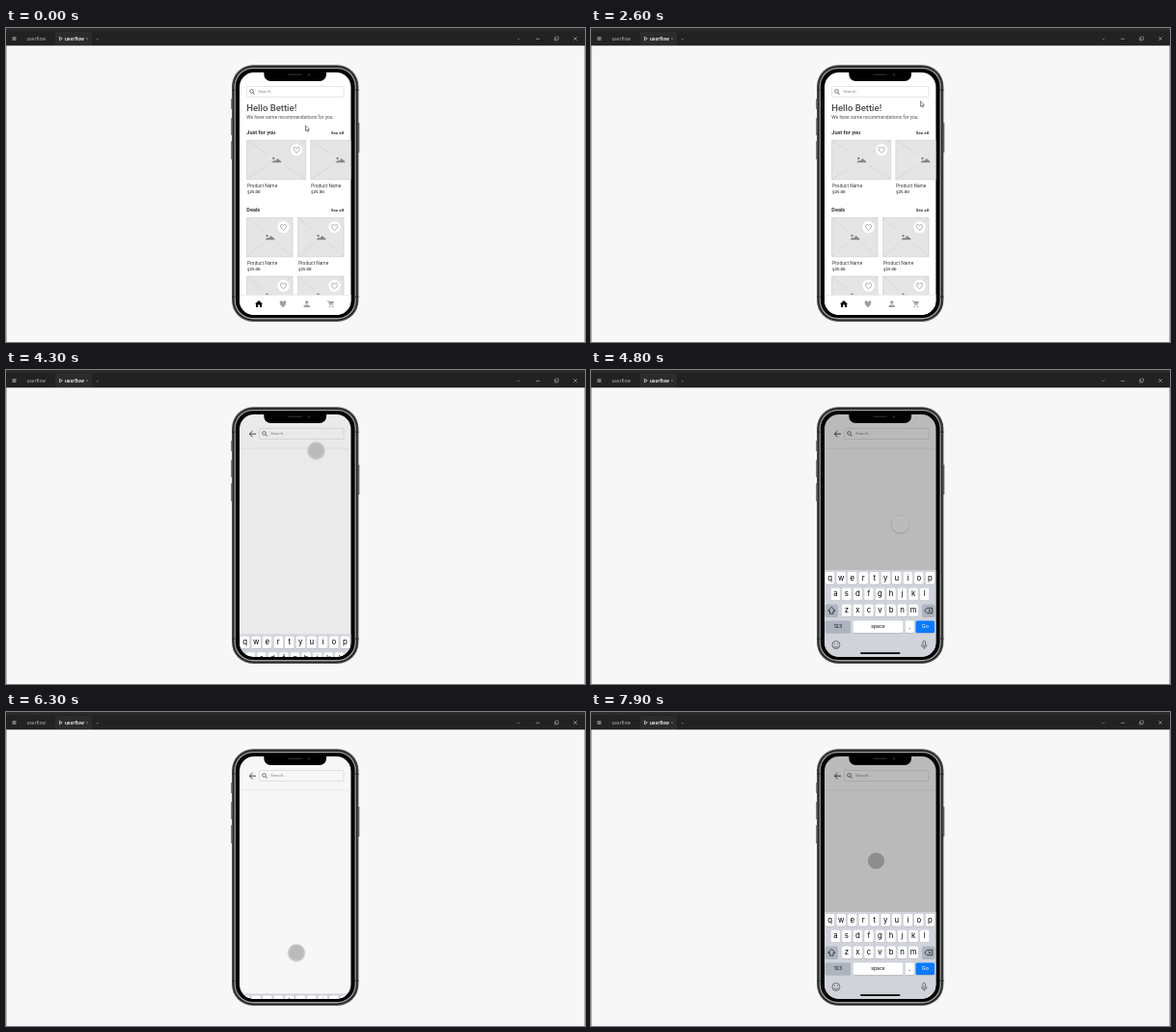
An HTML page with a canvas for the animation above (8 s loop, 600 by 325 pixels).

```html
<!DOCTYPE html>
<html lang="en">
<head>
<meta charset="utf-8">
<title>Search prototype</title>
<style>
html, body { margin: 0; width: 100%; height: 100%; overflow: hidden; background: #f7f7f7; }
canvas { display: block; width: 600px; height: 325px; }
</style>
</head>
<body>
<canvas id="stage"></canvas>
<script>
const LOOP = 8000, STEP = 100;
const UI = 'Roboto, sans-serif', KEYS = 'Inter, sans-serif';
const SCREEN = { x: 242, y: 46, w: 115.4, h: 251 };
const canvas = document.getElementById('stage');
const c = canvas.getContext('2d');
const dpr = window.devicePixelRatio || 1;
canvas.width = 600 * dpr;
canvas.height = 325 * dpr;

// Pointer moves; a sine bulge with the given half waves bends the way
const START = { x: 310.5, y: 101 };
const MOVES = [
  { from: 200, to: 1000, x: 289.5, y: 93.5, bx: -117, by: -22, waves: 1 },
  { from: 1500, to: 1600, x: 319.2, y: 184.8 },
  { from: 2000, to: 2900, x: 329, y: 86, bx: -15, by: 36, waves: 2 },
  { from: 2900, to: 3000, x: 321.5, y: 77 },
  { from: 4200, to: 4800, x: 320.5, y: 160 },
  { from: 4800, to: 6000, x: 301, y: 249, bx: 33, by: 12, waves: 1 },
  { from: 6300, to: 6800, x: 301, y: 81 },
  { from: 7300, to: 7900, x: 295.5, y: 154 }
];
const TAPS = [[4000, 4900], [6100, 6500], [7100, 7500]];

const clamp = v => Math.min(1, Math.max(0, v));

// CSS ease-out: cubic-bezier(0, 0, .58, 1)
function easeOut(x) {
  if (x <= 0 || x >= 1) return clamp(x);
  let lo = 0, hi = 1;
  for (let i = 0; i < 24; i++) {
    const u = (lo + hi) / 2;
    if (1.74 * u * u * (1 - u) + u ** 3 < x) lo = u; else hi = u;
  }
  return 3 * lo * lo - 2 * lo ** 3;
}

function pointer(t) {
  let p = START;
  for (const { from, to, x, y, bx = 0, by = 0, waves = 1 } of MOVES) {
    if (t < from) break;
    const k = clamp((t - from) / (to - from)), s = k * k * (3 - 2 * k);
    const bend = Math.sin(Math.PI * waves * s);
    p = { x: p.x + (x - p.x) * s + bx * bend, y: p.y + (y - p.y) * s + by * bend };
  }
  return p;
}

function stroke(color, lw = 0.6) {
  c.strokeStyle = color;
  c.lineWidth = lw;
  c.stroke();
}

function fill(color) {
  c.fillStyle = color;
  c.fill();
}

function box(x, y, w, h, color, r = 0) {
  c.beginPath();
  c.roundRect(x, y, w, h, r);
  if (color) fill(color);
}

function disc(x, y, r, color) {
  c.beginPath();
  c.arc(x, y, r, 0, 7);
  if (color) fill(color);
}

function path(...pts) {
  c.beginPath();
  for (let i = 0; i < pts.length; i += 2) c.lineTo(pts[i], pts[i + 1]);
}

// Closed outline from its right half, mirrored about x
function mirrored(x, y, half) {
  c.beginPath();
  half.forEach(([px, py]) => c.lineTo(x + px, y + py));
  [...half].reverse().forEach(([px, py]) => c.lineTo(x - px, y + py));
  c.closePath();
}

function text(s, x, y, size, color, weight = 400, align = 'left', family = UI) {
  c.font = `${weight} ${size}px ${family}`;
  c.textAlign = align;
  c.fillStyle = color;
  c.fillText(s, x, y);
}

function cross(x, y, r, color) {
  for (const s of [-1, 1]) {
    path(x - r, y - r * s, x + r, y + r * s);
    stroke(color);
  }
}

function heart(x, y, s) {
  c.beginPath();
  c.moveTo(x, y + s);
  for (const d of [-1, 1]) {
    c.moveTo(x, y + 0.95 * s);
    c.bezierCurveTo(x + d * 1.6 * s, y - 0.3 * s, x + d * 0.7 * s, y - 1.6 * s, x, y - 0.5 * s);
  }
}

function appWindow() {
  box(0, 0, 600, 325, '#f7f7f7');
  box(0, 0, 600, 18.3, '#222');
  box(0, 0, 600, 3, '#2b2b2b');
  box(51, 4, 38, 14, '#2c2c2c');
  for (const x of [0, 599.5]) box(x, 18, 0.5, 307, '#777');
  box(6.5, 9, 4, 4, '#777');
  text('userflow', 21.5, 12.7, 4.8, '#b5b5b5', 400, 'left', KEYS);
  text('userflow', 61, 12.7, 4.7, '#fff', 600, 'left', KEYS);
  path(55.5, 9.2, 58.3, 11, 55.5, 12.8);
  c.closePath();
  stroke('#fff');
  cross(84, 11, 1, '#777');
  text('+', 95, 12.8, 5, '#888', 400, 'center', KEYS);
  path(529.5, 10.5, 531, 12, 532.5, 10.5);
  stroke('#888');
  path(549, 11.3, 553, 11.3);
  stroke('#bbb');
  for (const d of [0, 1]) {
    box(568.5 + d, 10 - d, 3, 3, '#222');
    stroke('#aaa', 0.5);
  }
  cross(590, 11, 1.8, '#bbb');
}

function phone() {
  for (const [y, h] of [[73, 11], [93, 18], [117, 19]]) box(233.2, y, 1.5, h, '#666', 0.6);
  box(364.8, 98, 1.5, 31, '#666', 0.6);
  ['#555', '#1c1c1c', '#a0a2a4', '#000'].forEach((color, i) => {
    const d = i * 1.3;
    box(234 + d, 38.3 + d, 131.4 - 2 * d, 265.7 - 2 * d, color, 22 - d);
  });
  for (const y of [63.5, 277.5])
    for (const x of [234, 362]) box(x, y, 3.4, 1.5, '#333');
}

function notch() {
  box(267.3, 45, 64.7, 10, '#000', [0, 0, 7, 7]);
  box(292, 47.5, 15, 1.5, '#252525', 0.7);
  disc(314, 48.3, 1.3, '#20232c');
}

function searchBox(x) {
  box(x, 60.5, 350 - x, 11, null, 1);
  stroke('#d6d6d6');
  disc(x + 5, 65.4, 1.8);
  stroke('#555', 0.8);
  path(x + 6.3, 66.8, x + 8.2, 68.6);
  stroke('#555', 0.9);
  text('Search...', x + 11.7, 67.4, 4.2, '#858585');
}

function card(x, y, w) {
  const h = 40.5, mx = x + w / 2, my = y + h / 2;
  box(x, y, w, h, '#e5e5e5');
  stroke('#cacaca');
  for (const sx of [-w / 2, w / 2]) for (const sy of [-h / 2, h / 2]) {
    path(mx + sx * 0.3, my + sy * 0.3, mx + sx, my + sy);
    stroke('#d0d0d0');
  }
  path(mx - 5, my + 2.6, mx - 2.5, my + 0.4, mx - 0.8, my + 1, mx + 1.2, my - 1.6,
    mx + 5, my + 1.4, mx + 5, my + 2.6);
  fill('#858585');
  disc(mx - 2.8, my - 1.5, 1.2, '#858585');
  const hx = x + w - 9.5, hy = y + 9.8;
  disc(hx, hy, 6.2, '#fff');
  heart(hx, hy + 0.2, 3.3);
  stroke('#777');
}

function product(x, y, w) {
  card(x, y, w);
  text('Product Name', x + 0.3, y + 48.2, 4.9, '#3a3a3a');
  text('$25.00', x + 0.3, y + 55, 4.4, '#333', 500);
}

function heading(s, y) {
  text(s, 249.3, y, 5.55, '#333', 600);
  text('See all', 350, y, 4.4, '#333', 600, 'right');
}

function navBar() {
  const grey = '#a0a0a0';
  box(242, 276.3, 116, 21, '#fff');
  box(242, 276, 116, 0.6, '#ddd');
  mirrored(262, 282, [[0, 0], [4, 3.8], [3, 3.8], [3, 7], [1, 7], [1, 4.5]]);
  fill('#000');
  heart(287, 285.7, 3.7);
  fill(grey);
  disc(311.7, 283.9, 1.7, grey);
  box(308.5, 286.5, 6.4, 2.4, grey, [1.5, 1.5, 0, 0]);
  path(332.8, 282.4, 334, 282.4, 335.6, 286.7, 338.8, 286.7);
  stroke(grey, 0.8);
  mirrored(337.2, 283, [[2.8, 0], [1.6, 2.8]]);
  fill(grey);
  for (const x of [335.4, 338.8]) disc(x, 288.6, 0.8, grey);
}

function homeScreen() {
  box(242, 46, 116, 251, '#fff');
  searchBox(249.5);
  text('Hello Bettie!', 249.2, 86, 9.5, '#4a4a4a', 500);
  text('We have some recommendations for you.', 249.3, 93.9, 4.92, '#505050');
  heading('Just for you', 110.2);
  for (const x of [249.6, 315.8]) product(x, 116.3, 61);
  heading('Deals', 190);
  for (const x of [249.6, 302.6]) {
    product(x, 196.3, 47.4);
    card(x, 257, 47.4);
  }
  navBar();
}

function searchScreen() {
  box(242, 46, 116, 251, '#fbfbfb');
  box(242, 80.7, 116, 0.6, '#dcdcdc');
  path(259, 66.2, 252.4, 66.2);
  stroke('#333', 0.9);
  path(255.5, 63, 252.3, 66.2, 255.5, 69.4);
  stroke('#333', 0.9);
  searchBox(262.5);
}

function key(x, y, w, color, label, size = 7.8, ink = '#000') {
  box(x, y + 0.5, w, 12.7, '#a2a5ab', 1.6);
  box(x, y, w, 12.7, color, 1.6);
  text(label, x + w / 2, y + 6.1 + size * 0.31, size, ink, 400, 'center', KEYS);
}

function keyboard() {
  const grey = '#aeb4bf', ink = '#50555c', pitch = 11.53, rowY = i => 209 + 16.8 * i;
  box(242, 207, 116, 91, '#d0d3da');
  ['qwertyuiop', 'asdfghjkl', 'zxcvbnm'].forEach((row, r) => [...row].forEach((ch, i) =>
    key(294.7 + (i - (row.length - 1) / 2) * pitch, rowY(r), 9.6, '#fff', ch)));
  for (const x of [242.8, 343.2]) key(x, rowY(2), 13, grey, '');
  mirrored(249.3, 245.3, [[0, 0], [3.7, 3.9], [1.8, 3.9], [1.8, 6.9]]);
  stroke('#111', 0.7);
  path(345.8, 249, 348.3, 246.3, 353.7, 246.3, 353.7, 251.7, 348.3, 251.7);
  c.closePath();
  stroke('#111', 0.7);
  cross(350.8, 249, 1.2, '#111');
  key(242.8, rowY(3), 26.2, grey, '123', 5);
  key(271.5, rowY(3), 52, '#fff', 'space', 5);
  key(325.5, rowY(3), 9.4, '#fff', '.');
  key(336.6, rowY(3), 19.4, '#0a7aff', 'Go', 5.4, '#fff');
  disc(253.9, 284.5, 4);
  stroke(ink, 0.8);
  for (const d of [-1.5, 1.5]) disc(253.9 + d, 283.3, 0.6, ink);
  c.beginPath();
  c.arc(253.9, 284.9, 2.1, 0.2, Math.PI - 0.2);
  stroke(ink, 0.8);
  box(344, 280.3, 2.6, 5.2, null, 1.3);
  stroke(ink, 0.8);
  c.beginPath();
  c.arc(345.3, 284.3, 2.8, 0, Math.PI);
  stroke(ink, 0.8);
  box(344.9, 287.1, 0.8, 2, ink);
  box(279, 292.3, 41.5, 1.6, '#000', 0.8);
}

function arrow({ x, y }) {
  c.save();
  c.translate(x, y);
  path(0, 0, 0, 5.6, 1.3, 4.4, 2.2, 6.4, 3, 6, 2.2, 4.1, 3.9, 4.1);
  c.closePath();
  fill('#fff');
  stroke('#333');
  c.restore();
}

function touch({ x, y }, pressed) {
  if (!pressed) return disc(x, y, 8.6, 'rgba(0,0,0,.24)');
  c.save();
  c.shadowColor = 'rgba(0,0,0,.3)';
  c.shadowBlur = 2 * dpr;
  c.shadowOffsetY = 0.6 * dpr;
  disc(x, y, 8.5, '#c4c4c4');
  c.restore();
  disc(x, y, 7.4, '#bbb');
}

// How far the keyboard overlay is open, 0 to 1
function overlay(t) {
  const p = start => easeOut((t - start) / 300);
  return p(4250) - p(6060) + p(7160);
}

function render(t) {
  c.setTransform(dpr, 0, 0, dpr, 0, 0);
  appWindow();
  phone();

  c.save();
  box(SCREEN.x, SCREEN.y, SCREEN.w, SCREEN.h, null, 15);
  c.clip();
  const shown = easeOut((t - 3900) / 200), open = overlay(t);
  if (shown < 1) homeScreen();
  if (shown > 0) {
    c.globalAlpha = shown;
    searchScreen();
    c.globalAlpha = 1;
  }
  if (open > 0) {
    box(242, 46, 116, 251, `rgba(0,0,0,${0.26 * open})`);
    c.translate(0, 90 * (1 - open));
    keyboard();
  }
  c.restore();
  notch();

  if (t < 3000) arrow(pointer(t));
  else touch(pointer(t), TAPS.some(([a, b]) => t >= a && t < b));
}

function tick() {
  const t = (performance.now() + 0.5) % LOOP;
  render(Math.floor(t / STEP) * STEP);
  requestAnimationFrame(tick);
}
tick();
</script>
</body>
</html>
```
